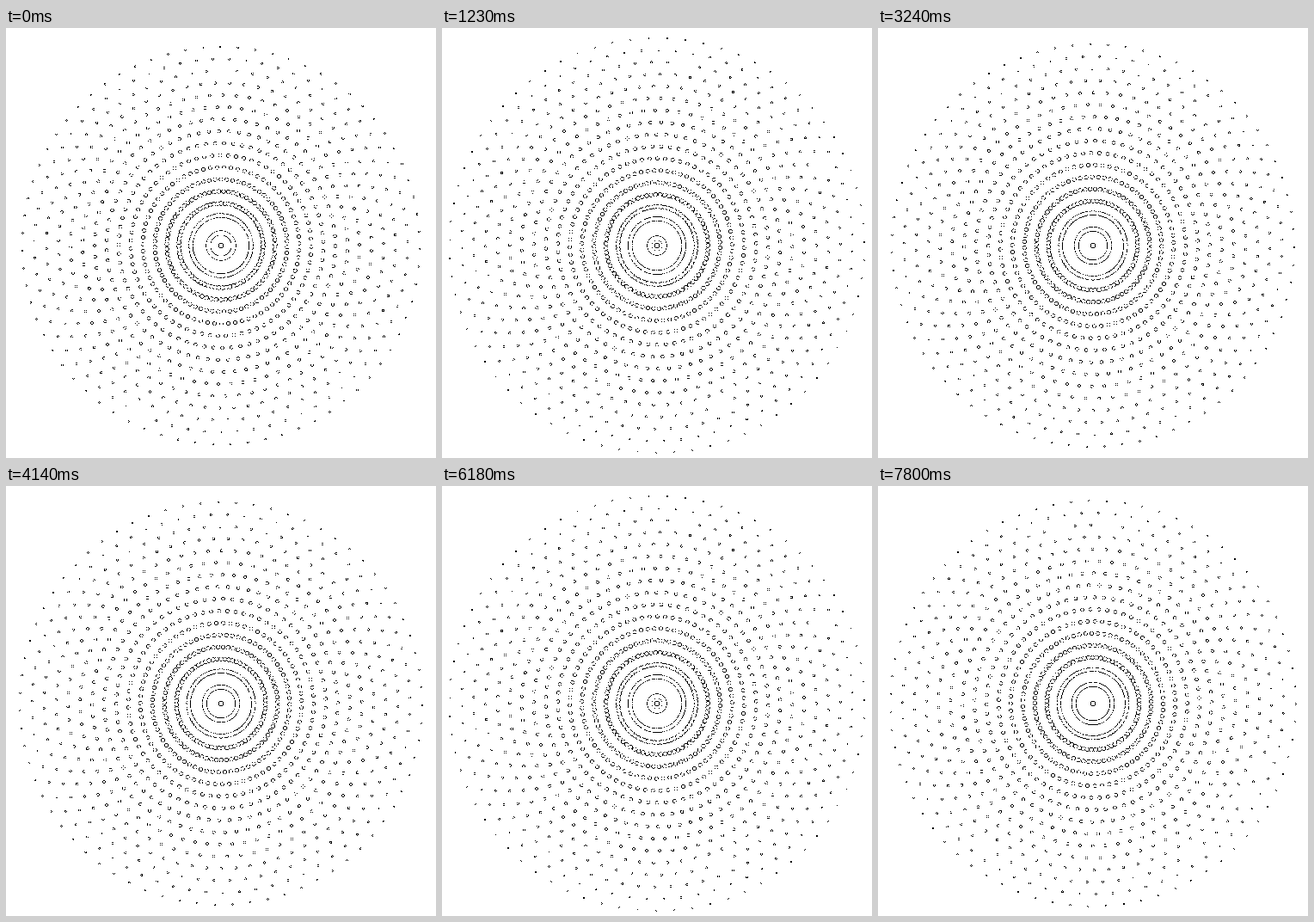
Recreate the animation shown at these times as an HTML page with a canvas. Size 500 by 500 pixels, loop 7830 ms.

```html
<!DOCTYPE html>
<html>
<head>
<meta charset="utf-8">
<style>
html, body { margin: 0; width: 100%; height: 100%; overflow: hidden; background: #fff; }
canvas { display: block; }
</style>
</head>
<body>
<canvas id="stage" width="500" height="500"></canvas>
<script>
const SIZE = 500, CX = 249.5, CY = 252.5;
const STEP_MS = 30, LOOP_STEPS = 261, CYCLE = 15;
const DOTS = 71, RINGS = 17, GAP = 14, OUTER = 231;
const TWIST = 2.78, START = -0.22, HALF_LINE = 0.3;
const BLACK = 0xff000000, WHITE = 0xffffffff;

const ctx = document.getElementById('stage').getContext('2d');
const img = ctx.createImageData(SIZE, SIZE);
const px = new Uint32Array(img.data.buffer);

function disc(x, y, r, color) {
  if (r <= 0) return;
  for (let j = Math.ceil(y - r); j <= y + r; j++) {
    for (let i = Math.ceil(x - r); i <= x + r; i++) {
      if ((i - x) ** 2 + (j - y) ** 2 <= r * r) px[j * SIZE + i] = color;
    }
  }
}

// Rings leave the centre quickly, then settle to an even speed.
const spread = r => r > 31 ? r : Math.max(0, 1.62 * (r - 11.9));
const dotSize = r => 0.6 + 2.1 * (1 - r / 245) ** 0.7;

function ring(radius, turn) {
  const size = dotSize(radius);
  // Black discs, then white ones, leave the outline of the merged ring.
  for (const [r, color] of [[size + HALF_LINE, BLACK], [size - HALF_LINE, WHITE]]) {
    for (let i = 0; i < DOTS; i++) {
      const a = (turn + i * 360 / DOTS) * Math.PI / 180;
      disc(CX + radius * Math.sin(a), CY - radius * Math.cos(a), r, color);
    }
  }
}

function draw(step) {
  const phase = step % CYCLE / CYCLE;
  px.fill(WHITE);
  for (let k = 0; k < RINGS; k++) {
    const age = phase - k;
    ring(spread(OUTER + GAP * age), START - TWIST * age);
  }
  ring(0, 0);
  ctx.putImageData(img, 0, 0);
}

const t0 = performance.now();
let last = -1;
function tick() {
  const step = Math.floor((performance.now() - t0) / STEP_MS) % LOOP_STEPS;
  if (step !== last) draw(last = step);
  requestAnimationFrame(tick);
}
draw(0);
tick();
</script>
</body>
</html>
```
